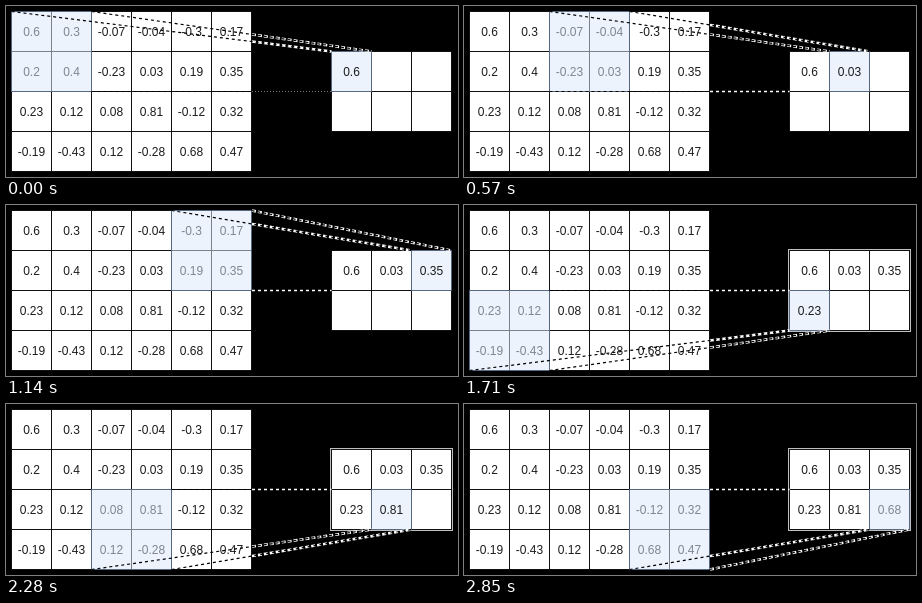
Animation, 452 px wide and 171 px high, one loop 3.42 s. Source, as an HTML page:

```html
<!DOCTYPE html>
<html lang="en">
<head>
<meta charset="utf-8">
<title>Max pooling</title>
<style>
  html, body { margin: 0; width: 100%; height: 100%; overflow: hidden; background: #000; }
  svg { display: block; width: 452px; height: 171px; }
  text { font: 12px "Liberation Sans", Arial, sans-serif; text-anchor: middle; fill: #1c1c1c; }
  .cell { fill: #fff; stroke: #111; }
  .window { fill: #dae8fc; fill-opacity: .52; stroke: #6c8ebf; stroke-opacity: .45; }
  .fringe { fill: none; stroke: #fff; stroke-opacity: .75; }
  .dark { stroke: #000; stroke-width: 1.2; stroke-dasharray: 3 3; }
  .halo { stroke: #fff; stroke-width: 2.6; stroke-dasharray: 4 2; }
  .light { stroke: #fff; stroke-width: 1.5; stroke-dasharray: 3 3; }
  .faint { stroke: #777; stroke-dasharray: 1 2; }
  .step { visibility: hidden; animation: show 3.42s step-end infinite; animation-delay: calc(var(--i) * .57s - 3.42s); }
  @keyframes show {
    0% { visibility: visible; }
    16.6667%, 100% { visibility: hidden; }
  }
</style>
</head>
<body>
<svg id="stage" viewBox="0 0 452 171"></svg>
<script>
const SIZE = 40, LEFT = 5.5, TOP = 5.5, OUT_X = 325.5, OUT_Y = 45.5, EDGE = 246;
const input = [
  [0.6, 0.3, -0.07, -0.04, -0.3, 0.17],
  [0.2, 0.4, -0.23, 0.03, 0.19, 0.35],
  [0.23, 0.12, 0.08, 0.81, -0.12, 0.32],
  [-0.19, -0.43, 0.12, -0.28, 0.68, 0.47]
];
const pooled = [0.6, 0.03, 0.35, 0.23, 0.81, 0.68];
const stage = document.getElementById("stage");

function add(parent, tag, attrs, label) {
  const el = document.createElementNS("http://www.w3.org/2000/svg", tag);
  for (const key in attrs) el.setAttribute(key, attrs[key]);
  if (label !== undefined) el.textContent = label;
  return parent.appendChild(el);
}

function box(parent, cls, x, y, width, height) {
  add(parent, "rect", { class: cls, x, y, width, height });
}

function number(parent, value, x, y) {
  add(parent, "text", { x: x + 20, y: y + 24.5 }, value);
}

function line(parent, cls, x1, y1, x2, y2) {
  add(parent, "line", { class: cls, x1, y1, x2, y2 });
}

// A dark dashed ray that carries a light halo over the black backdrop.
function ray(parent, x1, y1, x2, y2) {
  const t = Math.max(0, (EDGE - x1) / (x2 - x1));
  line(parent, "halo", x1 + (x2 - x1) * t, y1 + (y2 - y1) * t, x2, y2);
  line(parent, "dark", x1, y1, x2, y2);
}

const outputCell = i => [OUT_X + i % 3 * SIZE, OUT_Y + Math.floor(i / 3) * SIZE];

input.forEach((row, r) => row.forEach((value, c) => {
  const x = LEFT + c * SIZE, y = TOP + r * SIZE;
  box(stage, "cell", x, y, SIZE, SIZE);
  number(stage, value, x, y);
}));
pooled.forEach((_, i) => box(stage, "cell", ...outputCell(i), SIZE, SIZE));

pooled.forEach((_, i) => {
  const step = add(stage, "g", { class: "step", style: `--i:${i}` });
  const col = i % 3, row = Math.floor(i / 3), last = i === pooled.length - 1;
  const x = LEFT + col * 2 * SIZE, y = TOP + row * 2 * SIZE;
  const [ox, oy] = outputCell(i);
  const outer = y + row * 2 * SIZE, outerEnd = oy + row * SIZE;
  const middle = OUT_Y + SIZE;

  if (row) box(step, "fringe", OUT_X - 1, OUT_Y - 1, 3 * SIZE + 2, 2 * SIZE + 2);
  if (!last) box(step, "window", ox, oy, SIZE, SIZE);
  for (let k = 0; k <= i; k++) number(step, pooled[k], ...outputCell(k));
  if (last) box(step, "window", ox, oy, SIZE, SIZE);
  box(step, "window", x, y, 2 * SIZE, 2 * SIZE);

  ray(step, x, outer, ox, outerEnd);
  ray(step, x + 2 * SIZE, outer, ox + SIZE, outerEnd);
  line(step, "dark", i === 1 ? x : x + 2 * SIZE, middle, EDGE, middle);
  line(step, i ? "light" : "faint", EDGE, middle, OUT_X, middle);
});
</script>
</body>
</html>
```
